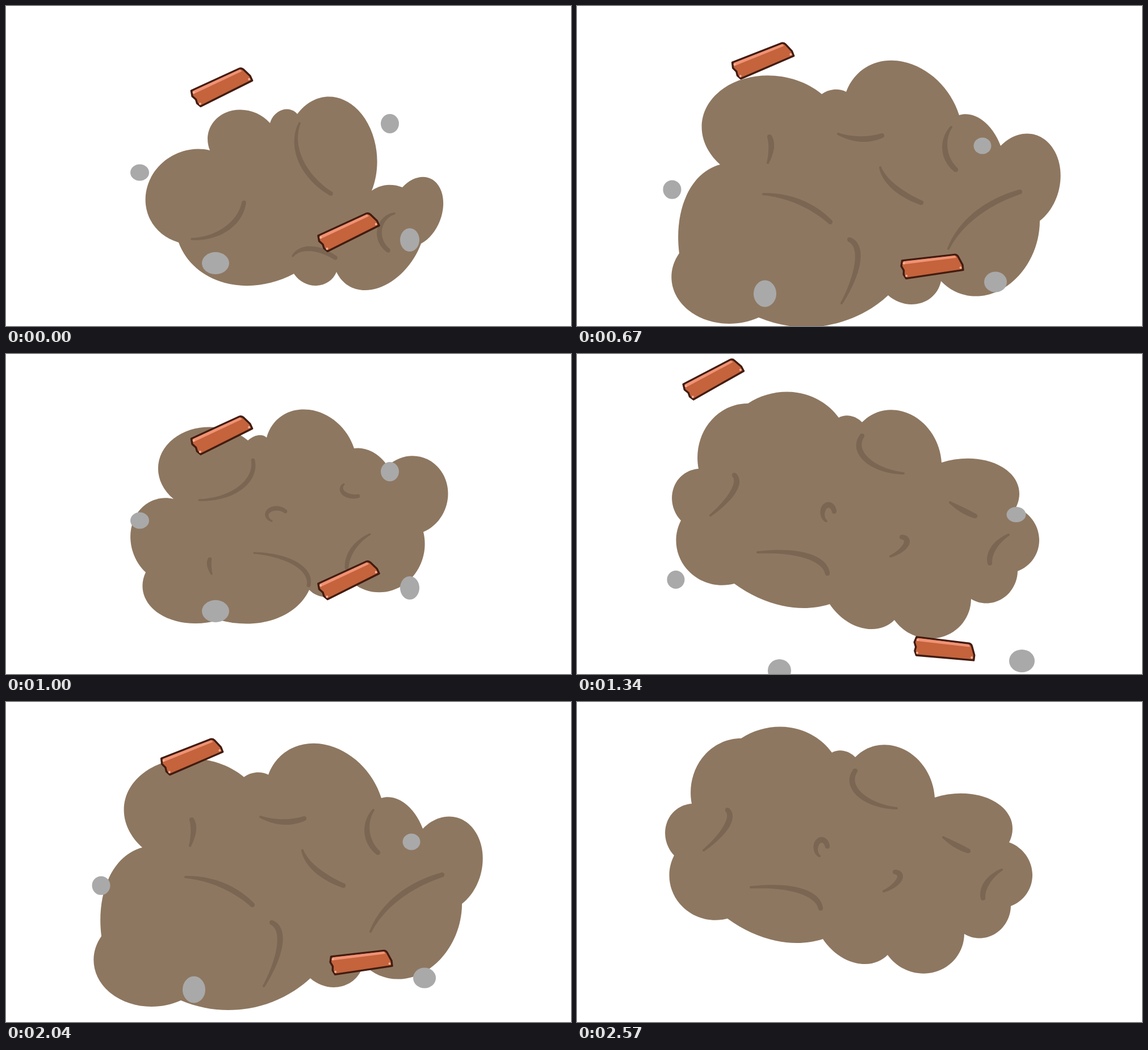
These frames come from a looping animation (995 px wide and 563 px high, 2800 ms). An HTML page:

```html
<!DOCTYPE html>
<html lang="en">
<head>
<meta charset="utf-8">
<title>Dust cloud</title>
<style>
  html, body { margin: 0; width: 100%; height: 100%; overflow: hidden; background: #fff; }
  svg { display: block; width: 100%; height: 100%; }
</style>
</head>
<body>
<svg id="stage" viewBox="0 0 995 563"></svg>
<script>
const NS = 'http://www.w3.org/2000/svg';
const LOOP = 2800, FPS = 30;
const DUST = '#8e7760', SHADE = '#7a6652', STONE = '#a9a9a9';

// rim: notches and lobe tops in turn. folds: thin end, top of the bow, thick end.
const clouds = [
  { ink: 9,
    rim: `304,416 250,314 359,254 386,188 465,206 486,183 513,190 620,183 644,325 670,315
      698,319 767,327 731,418 656,496 582,468 547,492 507,471 385,487`,
    folds: ['517,206 519,272 572,330', '327,410 388,392 419,346',
      '505,440 536,427 580,443', '684,365 658,393 673,430'] },
  { ink: 10,
    rim: `241,393 191,266 328,206 374,128 460,163 488,138 519,150 651,155 658,325 692,319
      722,324 807,352 749,449 642,536 566,489 527,513 477,484 325,483`,
    folds: ['335,242 352,294 338,331', '323,338 421,352 459,423', '471,192 497,207 527,195',
      '560,258 575,294 622,318', '609,426 643,406 698,402'] },
  { ink: 10,
    rim: `180,435 193,333 252,279 258,145 431,155 452,147 474,151 574,98 673,192 714,201
      746,246 842,257 815,378 752,496 641,484 604,523 548,509 440,562 320,548 196,535`,
    folds: ['336,276 342,250 339,230', '460,225 499,234 537,228', '534,284 558,318 606,346',
      '659,213 648,252 667,288', '328,331 392,345 446,380', '466,523 494,450 480,411',
      '654,427 702,367 780,327'] },
  { ink: 15, at: [12, 23],
    rim: `132,312 108,252 160,209 163,113 255,38 372,21 437,68 459,63 481,73 582,37
      664,130 795,125 831,207 887,266 850,340 820,403 762,411 706,482 604,470 545,497
      463,455 378,496 258,437 143,406`,
    folds: ['264,204 287,160 352,183', '352,183 400,155 445,177', '186,303 236,325 265,384',
      '421,388 475,402 529,386', '733,224 740,239 735,256', '735,256 747,258 753,266',
      '678,350 736,303 753,266'] },
  { ink: 8,
    rim: `246,384 224,294 295,255 295,149 426,152 444,143 459,147 534,98 613,166 645,172
      672,197 770,212 735,313 703,404 612,404 572,427 534,415 472,467 375,468 270,457`,
    folds: ['340,257 412,236 435,187', '468,294 464,275 492,277', '595,229 595,245 620,250',
      '362,387 358,372 359,361', '437,350 510,369 533,407', '641,317 611,343 600,376'] },
  { ink: 10, at: [12, 23],
    rim: `171,270 158,213 202,179 220,99 289,64 376,45 449,89 470,86 490,97 577,84
      630,168 737,176 761,247 802,303 764,359 736,408 682,408 630,475 547,445 490,459
      433,417 350,420 265,381 181,355`,
    folds: ['223,261 263,219 265,190', '563,187 498,163 490,121', '427,271 424,246 441,254',
      '645,238 666,251 689,262', '540,333 567,313 560,299', '748,295 722,318 715,345',
      '306,326 392,332 429,363'] }
];

// Planks: x, y, angle. Stones: x, y, rx, ry.
const debris = [
  { planks: [[380, 142.5, -24.6], [603.5, 397.5, -24.6]],
    stones: [[235.5, 293, 16.5, 14.5], [676, 207, 16, 17], [711, 411.5, 17, 20.5], [369, 452.5, 24, 19.5]] },
  { planks: [[327.5, 96, -21.3], [625.5, 458.5, -6.5]],
    stones: [[167.5, 323, 16, 16.5], [714, 246, 15.5, 14.5], [331, 506, 20, 23.5], [737, 485.5, 20, 18]] },
  { planks: [[240.5, 44, -27.5], [647, 520.5, 7]],
    stones: [[174, 397, 15.5, 16], [773.5, 282.5, 17, 13.5], [356.5, 557, 20.5, 20], [783.5, 540, 22.5, 20]] }
];

function el(tag, attrs, parent) {
  const node = document.createElementNS(NS, tag);
  for (const k in attrs) node.setAttribute(k, attrs[k]);
  return parent.appendChild(node);
}

const parse = s => s.trim().split(/\s+/).map(p => p.split(',').map(Number));
const mix = (a, b, k) => a.map((v, i) => v + (b[i] - v) * k);

// Circular arc from a to b, sheared so that its top lies at p: two cubics.
function bow(a, p, b) {
  const mid = mix(a, b, .5);
  const half = [b[0] - mid[0], b[1] - mid[1]], rise = [p[0] - mid[0], p[1] - mid[1]];
  const c = Math.hypot(...half);
  const h = Math.abs(half[0] * rise[1] - half[1] * rise[0]) / c;
  const angle = 2 * Math.atan(h / c);
  const k = 4 / 3 * Math.tan(angle / 4) * (c * c + h * h) / (2 * h);
  const place = (x, y) => mid.map((m, i) => m + half[i] * x / c + rise[i] * y / h);
  const x = c - k * Math.cos(angle), y = k * Math.sin(angle);
  return [[a, place(-x, y), place(-k, h), p], [p, place(k, h), place(x, y), b]];
}

function rimPath(text) {
  const pts = parse(text);
  let d = 'M' + pts[0];
  for (let i = 0; i < pts.length; i += 2)
    for (const [, u, v, end] of bow(pts[i], pts[i + 1], pts[(i + 2) % pts.length]))
      d += `C${u} ${v} ${end}`;
  return d + 'Z';
}

function bezier([a, b, c, d], t) {
  const ab = mix(a, b, t), bc = mix(b, c, t), cd = mix(c, d, t);
  const p = mix(ab, bc, t), q = mix(bc, cd, t);
  return { at: mix(p, q, t), dir: Math.atan2(q[1] - p[1], q[0] - p[0]) };
}

// A brush stroke that swells from a thin end to a round one.
function fold(text, ink, parent) {
  const halves = bow(...parse(text)), steps = 24;
  const left = [], right = [];
  for (let i = 0; i <= steps; i++) {
    const u = i / steps, s = u < .5 ? 0 : 1;
    const { at: [x, y], dir } = bezier(halves[s], u * 2 - s);
    const r = ink / 2 * (.4 + .6 * Math.sin(u * Math.PI * .75));
    const dx = -Math.sin(dir) * r, dy = Math.cos(dir) * r;
    left.push([x + dx, y + dy]);
    right.unshift([x - dx, y - dy]);
    if (i % steps === 0) el('circle', { cx: x, cy: y, r, fill: SHADE }, parent);
  }
  el('polygon', { points: left.concat(right).join(' '), fill: SHADE }, parent);
}

function plank([x, y, angle], parent) {
  const g = el('g', { transform: `translate(${x} ${y}) rotate(${angle})` }, parent);
  el('path', {
    d: 'M-51.5-16.5H42Q46-16 47.5-12L53.5 3V12L-48 15.5L-51.5 8L-50.5 1L-54-7Z',
    fill: '#c4633c', stroke: '#421c10', 'stroke-width': 3.4, 'stroke-linejoin': 'round'
  }, g);
  el('path', { d: 'M-49-14.8H42L44-10.5L-49-9.5Z', fill: '#f09274' }, g);
  for (const [cx, cy] of [[-49, -11.5], [-47, 11], [49.5, 7.5]])
    el('circle', { cx, cy, r: 2, fill: '#f8b09a' }, g);
}

const stage = document.getElementById('stage');

const cloudLayers = clouds.map(({ rim, folds, ink }) => {
  const g = el('g', {}, stage);
  el('path', { d: rimPath(rim), fill: DUST }, g);
  folds.forEach(f => fold(f, ink, g));
  return g;
});

const debrisLayers = debris.map(({ planks, stones }) => {
  const g = el('g', {}, stage);
  for (const [cx, cy, rx, ry] of stones) el('ellipse', { cx, cy, rx, ry, fill: STONE }, g);
  planks.forEach(p => plank(p, g));
  return g;
});

const show = (layers, n) => layers.forEach((g, i) => g.setAttribute('display', i === n ? 'inline' : 'none'));

// The cloud changes every 7 ticks and runs twice, the second time higher up.
// Debris changes every 5 ticks: three bursts, a pause, then one more.
function draw(ms) {
  const tick = Math.floor((ms % LOOP) * FPS / 1000);
  const step = Math.floor(tick / 7), n = step % 6;
  const [x, y] = clouds[n].at || [0, 0];
  const lift = step < 6 ? 0 : 1;
  cloudLayers[n].setAttribute('transform', `translate(${x - 12 * lift} ${y - 23 * lift})`);
  show(cloudLayers, n);

  const burst = tick < 45 ? tick : tick >= 56 && tick < 71 ? tick - 56 : -1;
  show(debrisLayers, burst < 0 ? -1 : Math.floor(burst / 5) % 3);
}

const start = performance.now();
function loop() {
  draw(performance.now() - start);
  requestAnimationFrame(loop);
}
draw(0);
requestAnimationFrame(loop);
</script>
</body>
</html>
```
